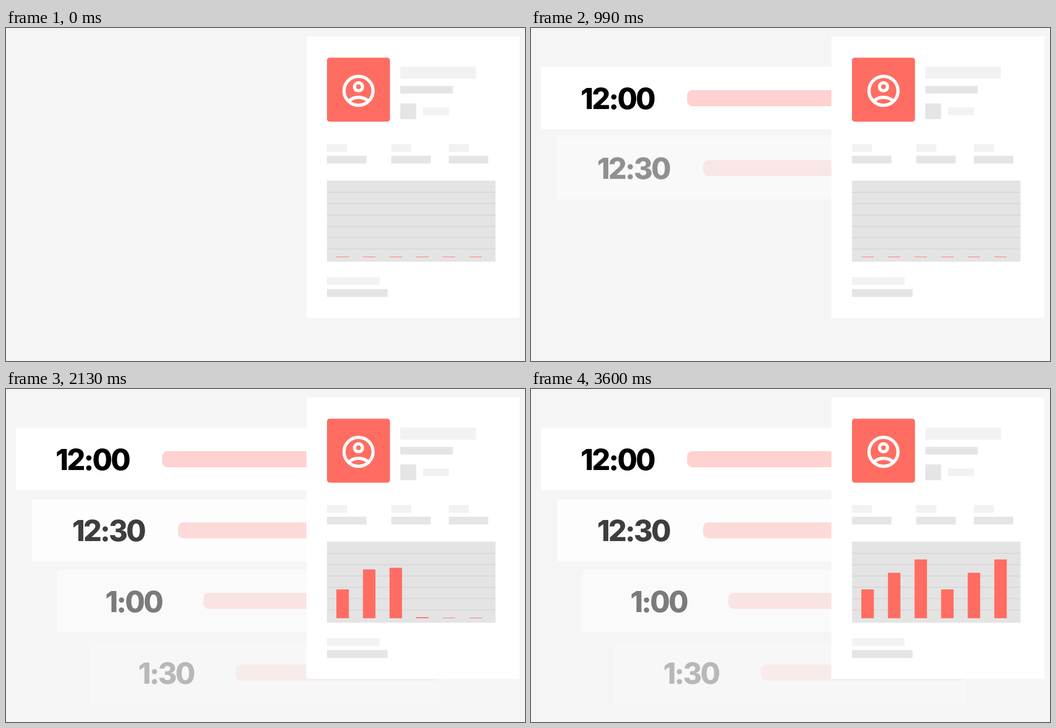
Animation of 933x600 px, one loop 3690 ms. Source, as an HTML page:

```html
<!DOCTYPE html>
<html lang="en">
<head>
<meta charset="utf-8">
<title>Schedule and report</title>
<style>
  html, body { margin: 0; width: 100%; height: 100%; overflow: hidden; background: #f5f5f5; }
  svg { display: block; }
  .time { font: 800 52px Inter, "Open Sans", sans-serif; letter-spacing: -.055em; text-anchor: middle; }
  .light { fill: #f2f2f2; }
  .dark { fill: #e5e5e5; }
  .accent { fill: #ff6d62; }
</style>
</head>
<body>
<svg width="933" height="600" viewBox="0 0 933 600">
  <defs>
    <clipPath id="plot"><rect x="577" y="275" width="303" height="137.3"/></clipPath>
    <clipPath id="badge"><circle cx="12" cy="12" r="9"/></clipPath>
  </defs>

  <g id="rows"></g>

  <rect x="540" y="15.3" width="383.3" height="507" fill="#fff"/>
  <rect class="accent" x="577" y="53.5" width="113.3" height="115.2" rx="5"/>
  <g transform="translate(598.9 78.4) scale(2.9)" fill="none" stroke="#fff" stroke-width="2">
    <circle cx="12" cy="12" r="9"/>
    <circle cx="12" cy="9.5" r="2.5"/>
    <circle cx="12" cy="25" r="9" clip-path="url(#badge)"/>
  </g>

  <rect class="light" x="708.8" y="69.4" width="136" height="22"/>
  <rect class="dark" x="708.8" y="104.2" width="94.5" height="14"/>
  <rect class="dark" x="708.8" y="135.8" width="28.5" height="28.5"/>
  <rect class="light" x="749.5" y="143" width="47" height="14.2"/>
  <g id="columns"></g>
  <rect class="light" x="577" y="449" width="94.7" height="14.2"/>
  <rect class="dark" x="577" y="470.4" width="109" height="14.2"/>

  <rect x="577" y="275" width="303" height="146" fill="#e4e4e4"/>
  <g id="lines" stroke="#d8d8d8" stroke-width="2"></g>
  <g id="bars" clip-path="url(#plot)"></g>
</svg>

<script>
const LOOP = 3690;
const EASE = 'cubic-bezier(.37, 0, .63, 1)';

function add(parent, tag, attrs, text = '') {
  const el = document.createElementNS('http://www.w3.org/2000/svg', tag);
  for (const key in attrs) el.setAttribute(key, attrs[key]);
  el.textContent = text;
  return parent.appendChild(el);
}

// steps: [time in ms, style] pairs; the first and last styles hold to the loop's ends
function animate(el, steps) {
  const frames = steps.map(([ms, style]) => ({ ...style, offset: ms / LOOP, easing: EASE }));
  el.animate(
    [{ ...frames[0], offset: 0 }, ...frames, { ...frames.at(-1), offset: 1 }],
    { duration: LOOP, iterations: Infinity }
  );
}

const shift = y => `translateY(${y}px)`;

// Time slots
const slots = [
  { label: '12:00', x: 18, y: 70.3, start: 455 },
  { label: '12:30', x: 46.7, y: 198.4, start: 810 },
  { label: '1:00', x: 92, y: 325.7, start: 1120 },
  { label: '1:30', x: 150.3, y: 454.8, start: 1550 }
];
slots.forEach(({ label, x, y, start }, i) => {
  const place = add(rows, 'g', { transform: `translate(${x} ${y})` });
  const row = add(place, 'g', {});
  add(row, 'rect', { width: 632, height: 112.2, fill: '#fff' });
  add(row, 'rect', { x: 262.6, y: 41.8, width: 368, height: 28.8, rx: 9.5, fill: '#ffd1d0' });
  add(row, 'text', { class: 'time', x: 137.4, y: 76 }, label);
  animate(row, [
    [start, { opacity: 0, transform: shift(-5) }],
    [start + 340, { opacity: 1 - i / 4, transform: shift(0) }]
  ]);
});

// Placeholder columns
for (const x of [577, 692.5, 796]) {
  add(columns, 'rect', { class: 'light', x, y: 209, width: 36, height: 14 });
  add(columns, 'rect', { class: 'dark', x, y: 230.2, width: 71, height: 14 });
}

// Chart: each bar rises past its height, then settles
for (let i = 0; i < 6; i++) {
  const y = 296 + i * 20.45;
  add(lines, 'line', { x1: 577, x2: 880, y1: y, y2: y });

  const height = [51.2, 81.2, 105.2][i % 3];
  const start = 1380 + i * 240;
  const bar = add(bars, 'rect', {
    class: 'accent', x: 593.9 + i * 47.8, y: 412.3 - height, width: 22.4, height: height + 20
  });
  animate(bar, [
    [start, { transform: shift(height) }],
    [start + 390, { transform: shift(-8.7) }],
    [start + 720, { transform: shift(0) }]
  ]);
}
</script>
</body>
</html>
```
